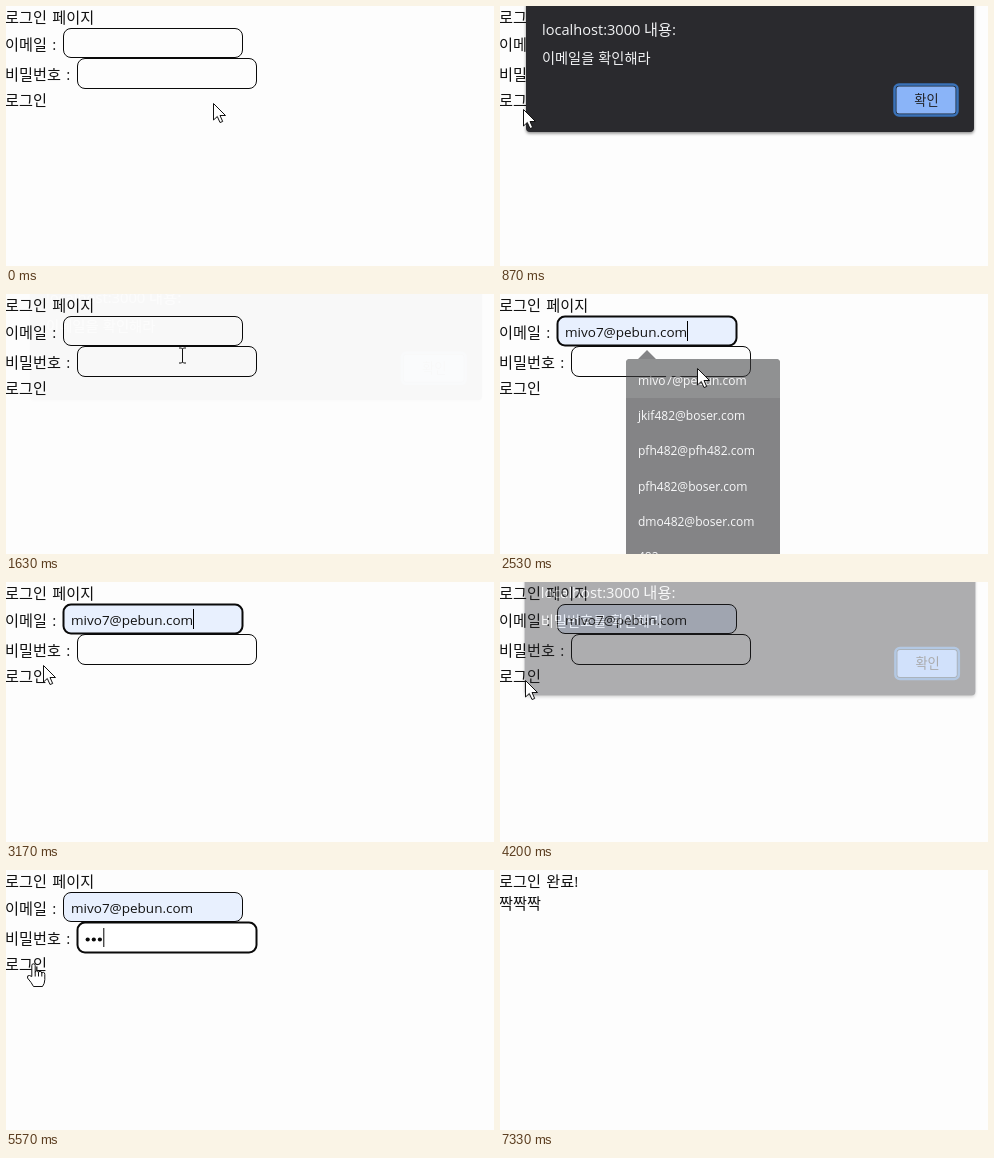
Recreate the animation shown at these times as an HTML page. Size 488 by 260 pixels, loop 8110 ms.

```html
<!DOCTYPE html>
<html lang="ko">
<head>
<meta charset="utf-8">
<title>로그인 페이지</title>
<style>
  html, body { margin: 0; width: 100%; height: 100%; overflow: hidden; background: #fdfdfd; }
  svg { display: block; width: 488px; height: 260px; }
  text { font-family: 'Open Sans', 'Noto Sans CJK KR', 'Noto Sans CJK', sans-serif; font-size: 15.2px; word-spacing: 1.4px; fill: #111; white-space: pre; }
  #address { font-size: 13.5px; }
  .field { stroke: #0a0a0a; }
  .caret { stroke: #000; }
  #dialog text { fill: #f1f2f4; }
  #dialog .title { font-size: 14.6px; }
  #dialog .body { font-size: 14.2px; word-spacing: .4px; }
  #dialog .ok { font-size: 13.2px; fill: #202124; }
  #list text { font-size: 12px; fill: #f6f6f8; }
  #pointer path { fill: #fff; stroke: #111; stroke-linejoin: round; }
  #pointer #beam { fill: none; }
</style>
</head>
<body>
<svg viewBox="0 0 488 260">
  <defs>
    <filter id="shadow" x="-5%" y="-10%" width="110%" height="125%">
      <feDropShadow dx="0" dy="1.5" stdDeviation="1.8" flood-color="#000" flood-opacity=".45"/>
    </filter>
  </defs>
  <rect width="488" height="260" fill="#fdfdfd"/>

  <g id="form">
    <text x="-1" y="17">로그인 페이지</text>
    <text x="-1" y="44">이메일 :</text>
    <text x="-1" y="74">비밀번호 :</text>
    <text x="-1" y="100">로그인</text>
    <rect id="email" class="field" x="57.5" y="22.5" width="179" height="29" rx="7.5"/>
    <text id="address" x="65" y="43">mivo7@pebun.com</text>
    <path id="emailCaret" class="caret"/>
    <rect id="password" class="field" x="71.5" y="52.5" width="179" height="30" rx="7.5"/>
    <g id="dots" fill="#0a0a0a"></g>
    <path id="passCaret" class="caret"/>
  </g>

  <g id="done">
    <text x="-1" y="17">로그인 완료!</text>
    <text x="-1" y="39">짝짝짝</text>
  </g>

  <g id="list">
    <path d="M130 65H138L147 56L156 65H276Q280 65 280 69V270H126V69Q126 65 130 65Z" fill="#292a2d"/>
    <path id="hover" d="M126 104V69Q126 65 130 65H276Q280 65 280 69V104Z" fill="#3f4042"/>
  </g>

  <g id="dialog">
    <rect x="26" y="-30" width="448" height="156" rx="4" fill="#292a2d" filter="url(#shadow)"/>
    <text class="title" x="42" y="28.5">localhost:3000</text>
    <text x="144" y="28.5">내용:</text>
    <text id="message" class="body" x="42" y="57"></text>
    <rect x="394.5" y="78.5" width="63" height="31" rx="4.5" fill="#1b2530" stroke="#3a72b8" stroke-width="2.5"/>
    <rect x="396.5" y="80.5" width="59" height="27" rx="2.5" fill="#8ab4f8"/>
    <text class="ok" x="426.5" y="98.5" text-anchor="middle">확인</text>
  </g>

  <g id="pointer">
    <path id="arrow" d="M0 0V16.5L3.8 13L6.5 19L9.2 18L6.5 12H12Z"/>
    <path id="hand" d="M-1.7 13V2A1.7 1.7 0 0 1 1.7 2V9Q1.7 7.3 3.3 7.3T5 9.3Q5 7.8 6.6 7.8T8.3 10Q8.3 8.8 9.8 8.8T11.3 11V16Q11.3 20 9 23H0Q-2 19 -6 14.5Q-6.5 11.5 -4 12ZM1.7 9V13M5 9.3V13M8.3 10V13"/>
    <path id="beam" d="M-3.5 -7.5H-1L0 -6.5L1 -7.5H3.5M0 -6.5V6.5M-3.5 7.5H-1L0 6.5L1 7.5H3.5"/>
  </g>
</svg>
<script>
const LOOP = 8110;
const FINISH = 6290;
const SVG = 'http://www.w3.org/2000/svg';
const $ = id => document.getElementById(id);
const clamp = (v, lo = 0, hi = 1) => Math.max(lo, Math.min(hi, v));
const between = (t, a, b) => t >= a && t < b;
const mix = (a, b, k) => a + (b - a) * k;
const ease = k => k * k * (3 - 2 * k);
const show = (id, on) => $(id).setAttribute('visibility', on ? 'inherit' : 'hidden');

function add(parent, tag, attrs, text = '') {
  const node = document.createElementNS(SVG, tag);
  for (const key in attrs) node.setAttribute(key, attrs[key]);
  node.textContent = text;
  return $(parent).appendChild(node);
}

const accounts = ['mivo7@pebun.com', 'jkif482@boser.com', 'pfh482@pfh482.com',
  'pfh482@boser.com', 'dmo482@boser.com', '482'];
accounts.forEach((name, i) => add('list', 'text', { x: 138, y: 91 + i * 35.2 }, name));

const DOT_GAP = 6.1;
const dots = Array.from({ length: 6 }, (_, i) => add('dots', 'circle', { cx: 81.7 + i * DOT_GAP, cy: 69.5, r: 2.1 }));

const home = { x: 207, y: 97 };
const moves = [
  { from: 30, to: 620, x: 23, y: 103, sag: 24 },
  { from: 1030, to: 1350, x: 416, y: 108 },
  { from: 1400, to: 1630, x: 176, y: 61 },
  { from: 1660, to: 1800, x: 174, y: 42 },
  { from: 2100, to: 2230, x: 197, y: 74 },
  { from: 2530, to: 3170, x: 37, y: 83 },
  { from: 3900, to: 4000, x: 25, y: 98 },
  { from: 4330, to: 4520, x: 416, y: 108 },
  { from: 4570, to: 5030, x: 148, y: 68 },
  { from: 5370, to: 5570, x: 27, y: 93 },
  { from: 7030, to: 7330, x: 480, y: 262 }
];

const OPENING = 190, CLOSING = 235;
const alerts = [
  { text: '이메일을 확인해라', open: 680, close: 1400 },
  { text: '비밀번호를 확인해라', open: 4130, close: 4560 }
];
const dialogOpacity = (a, t) => Math.min(clamp((t - a.open) / OPENING), clamp(1 - (t - a.close) / CLOSING));
const listOpacity = t => t < 1900 ? 0 : t < 1930 ? .5 : clamp((2650 - t) / 210);

function pointAt(t) {
  let { x, y } = home;
  for (const m of moves) {
    if (t < m.from) break;
    const raw = clamp((t - m.from) / (m.to - m.from));
    x = mix(x, m.x, ease(raw));
    y = mix(y, m.y, ease(raw)) + (m.sag || 0) * Math.sin(Math.PI * raw);
  }
  return { x, y };
}

function pointerShape(t, x, y) {
  const blocked = alerts.some(a => dialogOpacity(a, t) > .1) || (listOpacity(t) && y > 56);
  if (blocked || t >= FINISH) return 'arrow';
  if (x < 41 && between(y, 86, 107)) return 'hand';
  const onEmail = between(x, 57, 237) && between(y, 22, 52);
  const onPassword = between(x, 71, 251) && between(y, 52, 83);
  return onEmail || onPassword ? 'beam' : 'arrow';
}

function drawPointer(t) {
  const { x, y } = pointAt(t);
  const shape = pointerShape(t, x, y);
  $('pointer').setAttribute('transform', `translate(${x + .5} ${y + .5})`);
  show('pointer', t < 7330);
  for (const id of ['arrow', 'hand', 'beam']) show(id, id === shape);
}

function drawDialog(t) {
  const alert = alerts.find(a => dialogOpacity(a, t) > 0);
  show('dialog', alert);
  if (!alert) return;
  const seen = dialogOpacity(alert, t);
  const scale = 1 + .01 * (1 - seen);
  $('message').textContent = alert.text;
  $('dialog').setAttribute('opacity', seen);
  $('dialog').setAttribute('transform',
    `translate(${250 * (1 - scale)} ${-20 * (1 - seen)}) scale(${scale} 1)`);
}

function drawField(id, focused, fill) {
  $(id).setAttribute('stroke-width', focused ? 2 : 1);
  $(id).setAttribute('fill', fill);
}

// three keystrokes, 50 ms apart
const burst = (t, start) => clamp(Math.floor((t - start) / 50) + 1, 0, 3);

function drawForm(t) {
  const filled = t >= 2170;
  const emailFocus = between(t, 1900, 3990);
  const passFocus = between(t, 4990, 6200);
  drawField('email', emailFocus, filled ? '#e8f0fe' : '#fdfdfd');
  drawField('password', passFocus, passFocus ? '#fff' : 'none');
  show('address', filled);
  show('emailCaret', emailFocus && t < 3500);
  $('emailCaret').setAttribute('d', `M${filled ? 187.5 : 65.5} 27V47`);

  const count = burst(t, 5400) + burst(t, 5830);
  dots.forEach((dot, i) => dot.setAttribute('visibility', i < count ? 'inherit' : 'hidden'));
  show('passCaret', passFocus);
  $('passCaret').setAttribute('d', `M${79.5 + count * DOT_GAP} 58V77`);
}

function drawList(t) {
  const opacity = listOpacity(t);
  show('list', opacity > 0);
  show('hover', opacity > 0 && t >= 2170);
  $('list').setAttribute('opacity', opacity);
}

function draw(t) {
  const done = t >= FINISH;
  $('form').setAttribute('display', done ? 'none' : 'inline');
  show('done', done);
  drawForm(t);
  drawList(t);
  drawDialog(t);
  drawPointer(t);
}

const start = performance.now();
function tick() {
  draw((performance.now() - start) % LOOP);
  requestAnimationFrame(tick);
}
tick();
</script>
</body>
</html>
```
